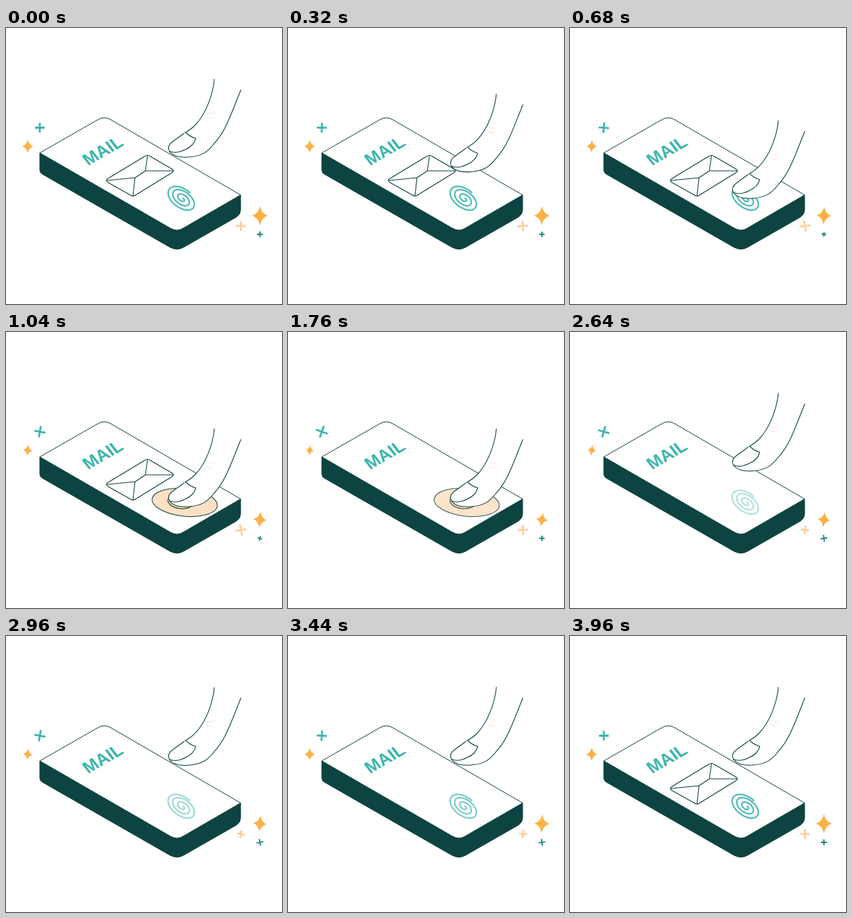
Recreate the animation shown at these times as an HTML page with a canvas. Size 400x400 px, loop 4000 ms.

```html
<!DOCTYPE html>
<html lang="en">
<head>
<meta charset="utf-8">
<title>Mail</title>
<style>
html, body { margin: 0; width: 100%; height: 100%; overflow: hidden; background: #fff; }
canvas { display: block; width: 400px; height: 400px; }
</style>
</head>
<body>
<canvas id="stage" width="400" height="400"></canvas>
<script>
const ctx = document.getElementById('stage').getContext('2d');
const LOOP = 4000, STEP = 40;
const DARK = '#0d4340', TEAL = '#3bb5ad', DEEP = '#178a7d';
const ORANGE = '#fbb145', PEACH = '#fbcf9f', SKIN = '#ffe0c4';

const clamp = v => Math.max(0, Math.min(1, v));
const ramp = (t, a, b) => clamp((t - a) / (b - a));
const smooth = p => p * p * (3 - 2 * p);
const mix = (a, b, p) => a + (b - a) * p;

function paint(path, fill, stroke, width = 1) {
  if (fill) { ctx.fillStyle = fill; ctx.fill(path); }
  if (stroke) { ctx.strokeStyle = stroke; ctx.lineWidth = width; ctx.stroke(path); }
}

function at(x, y, angle, draw) {
  ctx.save();
  ctx.translate(x, y);
  ctx.rotate(angle * Math.PI / 180);
  draw();
  ctx.restore();
}

const side = new Path2D('M49 181V206Q49 210 53 212L238 318Q248 323 257 318L334 274Q340 270 340 264V242L248 230Z');
const face = new Path2D('M49 181L132 133.5Q142 127 152 133L340 242L257 290Q248 296 238 290Z');

function drawDevice() {
  paint(side, DARK, DARK);
  paint(face, '#fff', DARK);
  ctx.save();
  ctx.transform(.867, -.5, .62, .8, 119, 200);
  ctx.font = 'bold 25px "Liberation Sans", Arial, sans-serif';
  ctx.fillStyle = TEAL;
  ctx.fillText('MAIL', 0, 0);
  ctx.restore();
}

// Skewed spiral lying on the face
function makePrint() {
  const p = new Path2D(), turns = 3.05, n = 160;
  for (let i = 0; i <= n; i++) {
    const u = i / n, a = u * turns * Math.PI * 2 - 1.3;
    const r = Math.min(1, .07 + u * 1.08);
    p.lineTo(255.5 + 20.5 * r * Math.cos(a), 247.5 + 18 * r * Math.sin(a + .49));
  }
  return p;
}
const print = makePrint();

function drawPrint(t) {
  const alpha = t < 1200 ? 1 - ramp(t, 800, 1000)
    : t < 2640 ? .45 * ramp(t, 2200, 2640)
    : t < 3440 ? mix(.45, .75, ramp(t, 2640, 3440))
    : mix(.75, 1, ramp(t, 3440, 3960));
  ctx.globalAlpha = alpha * .9;
  paint(print, null, TEAL, 2.2);
  ctx.globalAlpha = 1;
}

function drawPad(t) {
  const grow = smooth(ramp(t, 760, 1020));
  const alpha = 1 - ramp(t, 1680, 2240);
  if (!grow || !alpha) return;
  ctx.globalAlpha = alpha;
  at(259, 247, 6, () => {
    const p = new Path2D();
    p.ellipse(0, 0, 47.5 * grow, 20 * grow, 0, 0, 7);
    paint(p, SKIN, DARK);
  });
  at(253.5, 245.5, 6, () => {
    const p = new Path2D();
    p.ellipse(0, 0, 19 * grow, 10.5 * grow, 0, 0, 7);
    paint(p, PEACH, DARK);
  });
  ctx.globalAlpha = 1;
}

// Local coordinates centred on the envelope's resting place (194, 214)
const cover = new Path2D('M-46 4L7 -28Q11 -31 15 -28L46 -10Q51 -7 46 -4L-6 28Q-10 31 -14 28L-46 10Q-51 7 -46 4Z');
const folds = new Path2D('M-48 7L-7 3L8 -7L49 -7M-10 29L-7 3M8 -7L11 -29');

function envelopeSpot(t) {
  if (t <= 1120) return [194, 214];
  if (t <= 1680) {
    const p = ramp(t, 1120, 1680) ** 2;
    return [mix(194, 290, p), mix(214, -50, p)];
  }
  if (t <= 3440) return null;
  const s = 1 - (1 - ramp(t, 3440, 3920)) ** 2, q = 1 - s;
  return [-60 * q * q + 200 * s * q + 194 * s * s, 430 * q * q - 80 * s * q + 214 * s * s];
}

function drawEnvelope(t) {
  const spot = envelopeSpot(t);
  if (!spot) return;
  at(spot[0], spot[1], 0, () => {
    paint(cover, '#fff', DARK, 1.2);
    paint(folds, null, DARK, 1.1);
  });
}

const finger = new Path2D('M302 74C300 96 290 125 273 142C268 147 264 149 259 152L241 165C236 169 234 174 237 179C242 186 252 188 265 187C284 186 293 179 302 167C319 149 327 122 340.5 89.5');
const nail = new Path2D('M260 151Q267 158 275 160C273 168 267 173 260 176C252 180 243 182 236 178');
const wrinkle = new Path2D('M290 129L299 131M292 123Q297 125 302 123');

function drawFinger(t) {
  const drop = t < 1300 ? smooth(ramp(t, 0, 840)) : 1 - smooth(ramp(t, 1800, 3000));
  at(0, 66 * drop, 0, () => {
    paint(finger, '#fff', DARK, 1.1);
    paint(nail, '#fff', DARK, 1.1);
    paint(wrinkle, null, '#fde3d0', 1.2);
  });
}

function plus(x, y, size, angle, color, width) {
  at(x, y, angle, () => {
    const p = new Path2D(`M${-size} 0H${size}M0 ${-size}V${size}`);
    paint(p, null, color, width);
  });
}

function star(x, y, w, h, angle) {
  at(x, y, angle, () => {
    const a = w * .2, b = h * .2;
    paint(new Path2D(`M0 ${-h}Q${a} ${-b} ${w} 0Q${a} ${b} 0 ${h}Q${-a} ${b} ${-w} 0Q${-a} ${-b} 0 ${-h}Z`), ORANGE);
  });
}

function drawSparkles(t) {
  const turn = t / LOOP * Math.PI * 2;
  const wave = Math.sin(turn), bump = (1 - Math.cos(turn)) / 2;
  const k = 1 - .28 * bump;
  plus(49, 144.5, 7 + 2 * bump, 20 * bump, TEAL, 2.8);
  star(31.5, 171.5, 8 * k, 10 * k, 10 * bump);
  star(368, 272, 11.5 * k, 14 * k, 10 * bump);
  plus(340.5, 287, 7 + 1.2 * wave, -10 * wave, PEACH, 2.8);
  plus(368, 299, 4.2 - .8 * wave, 10 * wave, DEEP, 1.9);
}

function frame(now) {
  const t = Math.floor(now % LOOP / STEP) * STEP;
  ctx.fillStyle = '#fff';
  ctx.fillRect(0, 0, 400, 400);
  ctx.lineJoin = 'round';
  drawDevice();
  drawPrint(t);
  drawPad(t);
  drawEnvelope(t);
  drawFinger(t);
  drawSparkles(t);
}

const start = performance.now();
function tick() {
  frame(performance.now() - start);
  requestAnimationFrame(tick);
}
tick();
</script>
</body>
</html>
```
